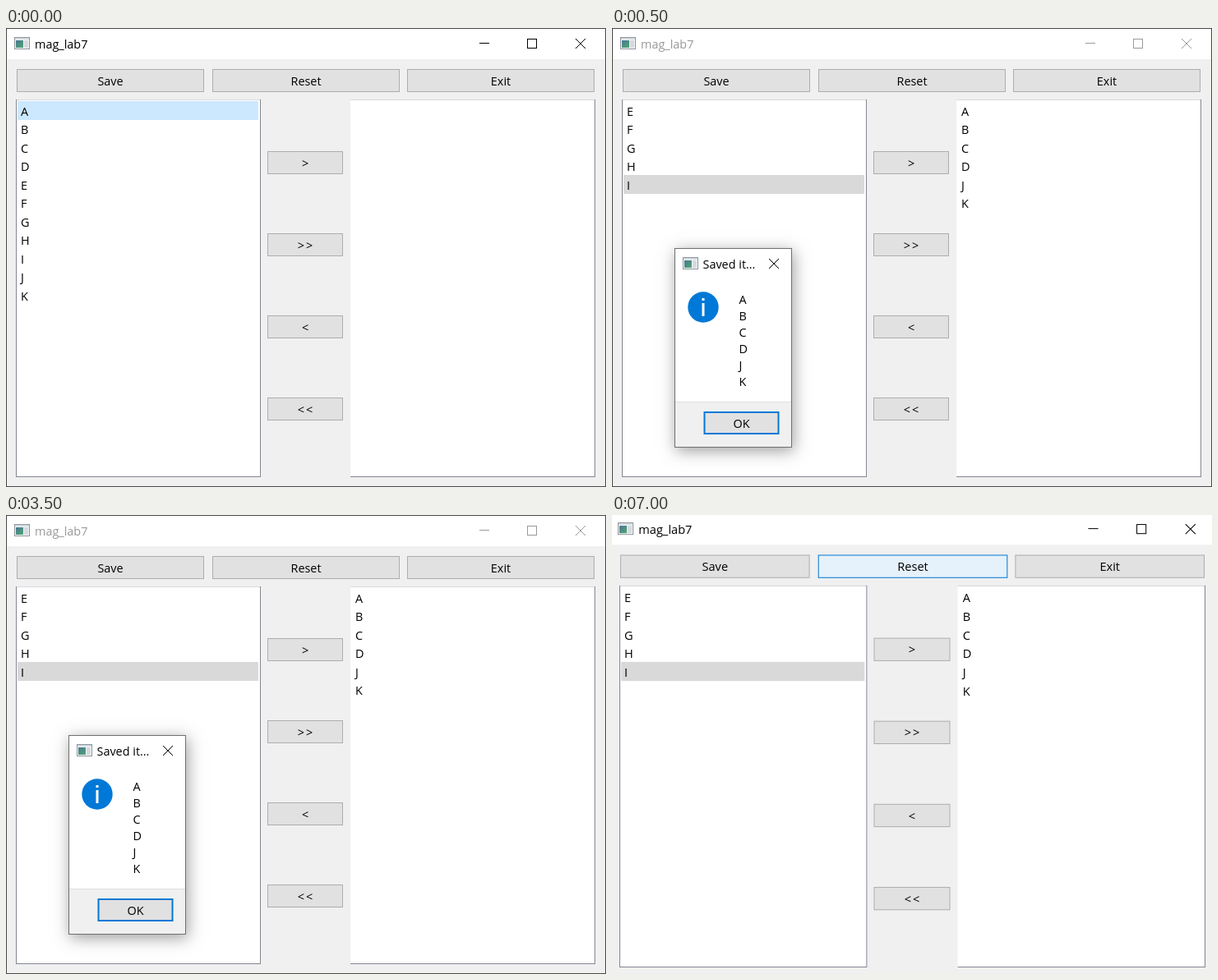
These frames come from a looping animation (730x559 px, 8000 ms). An HTML page with a canvas:

```html
<!DOCTYPE html>
<html lang="en">
<head>
<meta charset="utf-8">
<title>mag_lab7</title>
<style>
  html, body { margin: 0; width: 100%; height: 100%; overflow: hidden; background: #f0f0f0; }
  canvas { display: block; }
</style>
</head>
<body>
<canvas id="stage" width="730" height="559"></canvas>
<script>
const ctx = document.getElementById("stage").getContext("2d");
const LOOP = 8000;
const BLUE = "#0078d7";

const SCENES = [
  { until: 500, left: "ABCDEFGHIJK", right: "", selected: 0, selection: "#cce8ff" },
  { until: 5500, left: "EFGHI", right: "ABCDJK", selected: 4, selection: "#d9d9d9", dialog: true },
  { until: LOOP, left: "EFGHI", right: "ABCDJK", selected: 4, selection: "#d9d9d9",
    hovered: "Reset", zoomed: true }
];

function rect(x, y, w, h, color) {
  ctx.fillStyle = color;
  ctx.fillRect(x, y, w, h);
}

function box(x, y, w, h, fill, border, line = 1) {
  rect(x, y, w, h, border);
  rect(x + line, y + line, w - 2 * line, h - 2 * line, fill);
}

function text(string, x, baseline, color = "#000", align = "left") {
  ctx.fillStyle = color;
  ctx.textAlign = align;
  ctx.fillText(string, x, baseline);
}

function lines(color, ...segments) {
  ctx.strokeStyle = color;
  ctx.lineWidth = 1;
  ctx.beginPath();
  for (const [x1, y1, x2, y2] of segments) {
    ctx.moveTo(x1, y1);
    ctx.lineTo(x2, y2);
  }
  ctx.stroke();
}

function cross(x, y, color) {
  lines(color, [x - 6, y - 6, x + 6, y + 6], [x - 6, y + 6, x + 6, y - 6]);
}

function appIcon(x, y) {
  box(x, y, 19, 15, "#f4f6f8", "#8d959b");
  rect(x + 1, y + 1, 17, 2, "#d3dae0");
  const shade = ctx.createLinearGradient(x, y, x + 11, y + 13);
  shade.addColorStop(0.2, "#4a7196");
  shade.addColorStop(1, "#4fa873");
  rect(x + 2, y + 4, 9, 9, shade);
  rect(x + 12, y + 4, 5, 9, "#d5dade");
}

function button(label, x, y, w, hovered) {
  box(x, y, w, 28, hovered ? "#e5f1fb" : "#e1e1e1", hovered ? BLUE : "#adadad");
  const isArrow = /[<>]/.test(label);
  ctx.letterSpacing = isArrow ? "2px" : "0px";
  text(label, x + w / 2 + (isArrow ? 1 : 0), y + 19.5, "#000", "center");
  ctx.letterSpacing = "0px";
}

function list(items, x, hasLeftEdge, selected, selection) {
  const right = x + 297.5;
  rect(x, 87, 298, 460, "#fff");
  lines("#d8dadd", [x, 87.5, right, 87.5]);
  lines("#828790", [right, 87, right, 547], [x, 546.5, right, 546.5]);
  if (hasLeftEdge) lines("#828790", [x + 0.5, 87, x + 0.5, 547]);
  if (selected !== undefined) rect(x + 2, 89 + selected * 22.5, 293, 23, selection);
  [...items].forEach((item, i) => text(item, x + 6, 107 + i * 22.45));
}

function titleBar(color) {
  rect(0, 0, 730, 38, "#fff");
  appIcon(10, 11);
  text("mag_lab7", 35, 25, color);
  lines(color, [576, 18.5, 588, 18.5]);
  ctx.strokeRect(634.5, 13.5, 11, 11);
  cross(699, 19, color);
}

function dialog(items) {
  ctx.save();
  ctx.shadowColor = "rgba(0, 0, 0, 0.38)";
  ctx.shadowBlur = 18;
  ctx.shadowOffsetX = 2;
  ctx.shadowOffsetY = 4;
  rect(76, 268, 143, 243, "#fff");
  ctx.restore();
  box(76, 268, 143, 243, "#fff", "#707070");
  appIcon(86, 279);
  text("Saved it...", 110.5, 293);
  cross(197, 287, "#000");

  ctx.fillStyle = BLUE;
  ctx.beginPath();
  ctx.arc(111, 340, 18.7, 0, Math.PI * 2);
  ctx.fill();
  rect(109.5, 329, 3, 3, "#fff");
  rect(109.5, 335, 3, 16, "#fff");

  [...items].forEach((item, i) => text(item, 154.5, 336 + i * 20));
  rect(77, 455, 141, 55, "#f0f0f0");
  lines("#dfdfdf", [77, 455.5, 218, 455.5]);
  box(111.5, 467, 92, 28, "#e1e1e1", BLUE, 2);
  text("OK", 157.5, 486.5, "#000", "center");
}

function draw(scene) {
  ctx.setTransform(1, 0, 0, 1, 0, 0);
  if (scene.zoomed) ctx.setTransform(1.0114, 0, 0, 1.0112, -3.15, -2.1);
  ctx.font = '14.4px "Open Sans", "Noto Sans", sans-serif';
  rect(0, 0, 730, 559, "#f0f0f0");
  titleBar(scene.dialog ? "#999" : "#000");

  ["Save", "Reset", "Exit"].forEach((label, i) =>
    button(label, [13, 251, 488][i], 50, 228, label === scene.hovered));
  list(scene.left, 12, true, scene.selected, scene.selection);
  list(scene.right, 419, false);
  [">", ">>", "<", "<<"].forEach((label, i) => button(label, 318, 150 + i * 100, 92));

  if (scene.dialog) dialog(scene.right);
  ctx.strokeStyle = "#484848";
  ctx.strokeRect(0.5, 0.5, 729, 558);
}

function tick() {
  const time = performance.now() % LOOP;
  draw(SCENES.find(scene => time < scene.until));
  requestAnimationFrame(tick);
}
tick();
</script>
</body>
</html>
```
